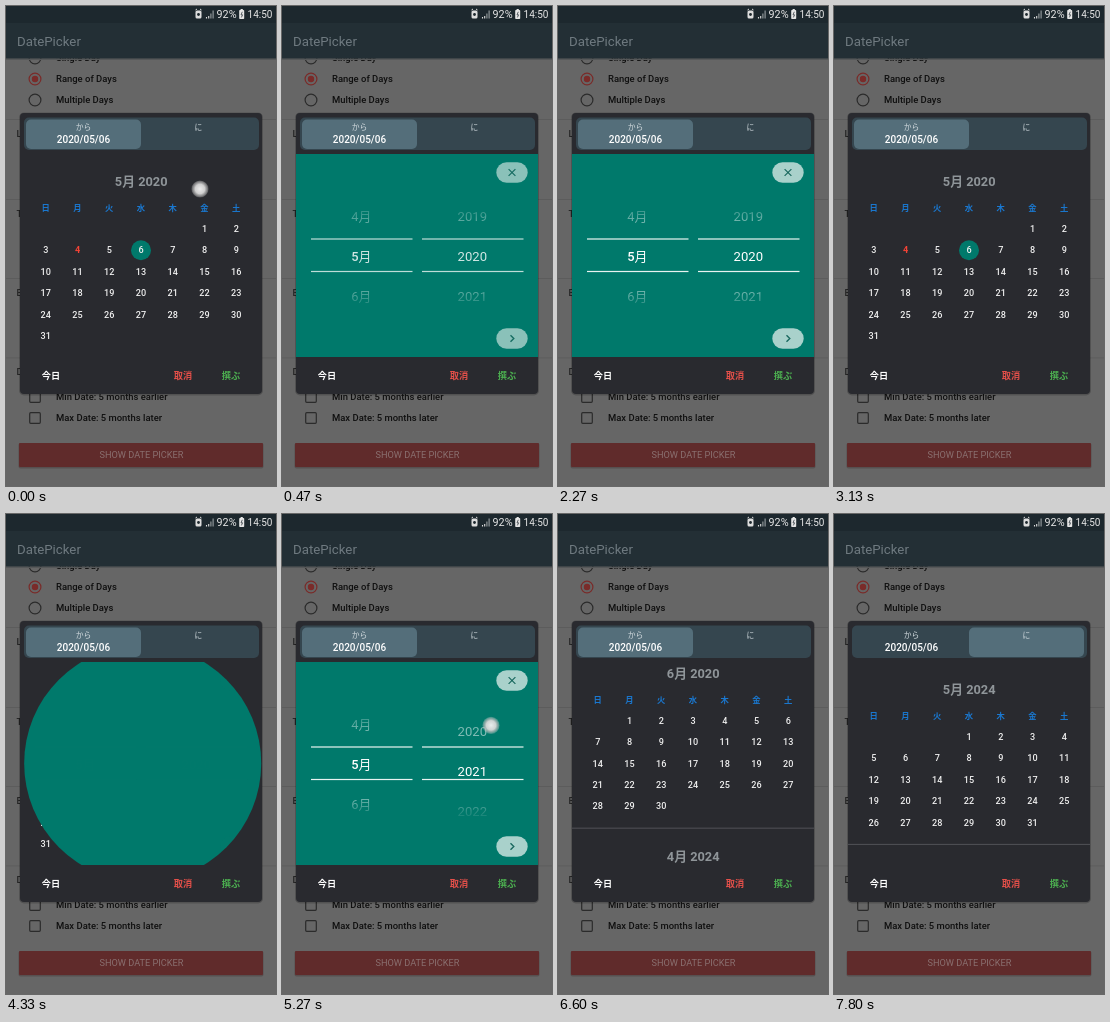
Animation, 270 px wide and 480 px high, one loop 8 s. Source, as an HTML page:

```html
<!DOCTYPE html>
<html lang="ja">
<head>
<meta charset="utf-8">
<title>Date picker</title>
<style>
  html, body { margin: 0; width: 100%; height: 100%; overflow: hidden; background: #686868; }
  svg { display: block; width: 100%; height: 100%; }
  text { font-family: Roboto, "Noto Sans CJK JP", "Noto Sans CJK", sans-serif; white-space: pre; }
</style>
</head>
<body>
<svg id="stage" viewBox="0 0 270 480">
  <defs>
    <clipPath id="bodyClip"><rect x="14" y="148" width="242" height="203"/></clipPath>
    <clipPath id="circleClip"><circle id="hole"/></clipPath>
    <radialGradient id="touchFill">
      <stop offset="0" stop-color="#f4f4f4"/>
      <stop offset=".55" stop-color="#d8d8d8"/>
      <stop offset=".75" stop-color="#bbb" stop-opacity=".8"/>
      <stop offset="1" stop-color="#ccc" stop-opacity=".25"/>
    </radialGradient>
    <linearGradient id="wheelFade" x1="0" y1="0" x2="0" y2="1">
      <stop offset="0" stop-color="#000"/>
      <stop offset=".2" stop-color="#fff"/>
      <stop offset=".8" stop-color="#fff"/>
      <stop offset="1" stop-color="#000"/>
    </linearGradient>
    <mask id="wheelMask" maskUnits="userSpaceOnUse" x="14" y="192" width="242" height="116">
      <rect x="14" y="192" width="242" height="116" fill="url(#wheelFade)"/>
    </mask>
  </defs>
  <g id="page"></g>
  <g id="dialog"></g>
  <g clip-path="url(#bodyClip)">
    <g id="months"></g>
    <g clip-path="url(#circleClip)">
      <rect x="14" y="148" width="242" height="203" fill="#00796b"/>
      <g id="chooser"></g>
    </g>
  </g>
  <g id="footer"></g>
  <circle id="touch" r="8.6" fill="url(#touchFill)"/>
</svg>
<script>
const LOOP = 8000;
const CENTER = [135, 249.5];
const TITLE = [194, 183], CLOSE = [235, 166], NEXT = [231, 333];
const FULL_RADIUS = 160;
const ROW = 21.4, WHEEL_ROW = 40;
const $ = id => document.getElementById(id);

function add(parent, tag, attrs, content) {
  const node = document.createElementNS('http://www.w3.org/2000/svg', tag);
  for (const key in attrs) node.setAttribute(key, attrs[key]);
  if (content !== undefined) node.textContent = content;
  parent.appendChild(node);
  return node;
}
const rect = (parent, x, y, width, height, fill, rx = 0) =>
  add(parent, 'rect', { x, y, width, height, fill, rx });
const path = (parent, d, stroke, width) =>
  add(parent, 'path', { d, stroke, 'stroke-width': width, fill: 'none' });

// Text whose capitals are vertically centred on y.
const label = (parent, content, x, y, size, fill, weight = 400, anchor = 'middle') =>
  add(parent, 'text', { x, y: y + size * 0.36, fill, 'font-size': size,
    'font-weight': weight, 'text-anchor': anchor }, content);

function buildPage() {
  const g = $('page');
  rect(g, 0, 0, 270, 480, '#666');
  for (const y of [113, 193, 272, 351.5]) rect(g, 0, y, 270, 0.8, '#5a5a5a');
  [['Single Day', 52], ['Range of Days', 73], ['Multiple Days', 94]].forEach(([name, y], i) => {
    const color = i === 1 ? '#7a2b29' : '#2b2b2b';
    add(g, 'circle', { cx: 29, cy: y, r: 5.9, fill: 'none', stroke: color, 'stroke-width': 1.2 });
    if (i === 1) add(g, 'circle', { cx: 29, cy: y, r: 3.2, fill: color });
    label(g, name, 50, y, 9.45, '#101010', 500, 'start');
  });
  ['L', 'T', 'E', 'D'].forEach((c, i) => label(g, c, 10.5, 128 + 79.3 * i, 9.45, '#222', 500, 'start'));
  [['Min', 'earlier', 391], ['Max', 'later', 412]].forEach(([end, side, y]) => {
    add(g, 'rect', { x: 23.7, y: y - 5.3, width: 10.6, height: 10.6, rx: 1,
      fill: 'none', stroke: '#2b2b2b', 'stroke-width': 1.2 });
    label(g, `${end} Date: 5 months ${side}`, 50, y, 9.45, '#101010', 500, 'start');
  });
  rect(g, 12.5, 437, 245, 25.5, '#575050', 2);
  rect(g, 13, 437, 244, 24, '#602b2b', 1);
  label(g, 'SHOW DATE PICKER', 135.5, 449, 9.2, '#8a7070');

  rect(g, 0, 52.5, 270, 1.5, '#565859');
  rect(g, 0, 17, 270, 35.5, '#232f35');
  label(g, 'DatePicker', 11, 35, 13.25, '#6f7a80', 400, 'start');
  rect(g, 0, 0, 270, 17, '#1d282e');
  rect(g, 189.5, 4.5, 6, 8, '#ddd', 1.5);
  add(g, 'circle', { cx: 192.5, cy: 8.5, r: 1.4, fill: '#1d282e' });
  path(g, 'M189.5 4l1.5-1M195.5 4l-1.5-1', '#ddd', 1);
  path(g, 'M200.5 12.5v-1.5M202.7 12.5v-2.5', '#ddd', 1.1);
  path(g, 'M204.9 12.5v-5M207.1 12.5v-8', '#9aa0a3', 1.1);
  label(g, '92%', 210.5, 8.2, 10.8, '#e6e6e6', 400, 'start');
  rect(g, 233.2, 4, 5, 9, '#e6e6e6', 0.8);
  rect(g, 234.6, 3, 2.2, 2, '#e6e6e6');
  path(g, 'M236.3 5.8l-1.3 3h1.6l-1.2 2.6', '#1d282e', 0.7);
  label(g, '14:50', 254, 8.2, 10, '#e6e6e6');
}

function buildDialog() {
  const g = $('dialog');
  add(g, 'rect', { x: 13, y: 106.5, width: 244, height: 283, rx: 5, fill: '#000', opacity: 0.2 });
  rect(g, 14, 107, 242, 281, '#292a2f', 4);
  rect(g, 18, 111.5, 235, 32.5, '#35464f', 5);
  const tab = rect(g, 20, 113.5, 115, 29.5, '#546e7a', 5);
  label(g, 'から', 77.5, 121, 7.8, '#d5dde1');
  label(g, 'に', 192.5, 121, 7.8, '#d5dde1');
  label(g, '2020/05/06', 77.5, 133.3, 10, '#fff', 500);
  const f = $('footer');
  label(f, '今日', 45, 370, 9.2, '#fff', 700);
  label(f, '取消', 177, 370, 9.2, '#e5504a', 700);
  label(f, '撰ぶ', 225, 370, 9.2, '#4caf50', 700);
  return tab;
}

// Stacks the months and returns the scroll distance to the last one.
function buildMonths() {
  const g = $('months');
  const column = i => 135 + 31.75 * (i - 3);
  let top = 175.5, last = top;
  for (const [year, month] of [[2020, 5], [2020, 6], [2024, 4], [2024, 5]]) {
    const first = new Date(year, month - 1, 1).getDay();
    const days = new Date(year, month, 0).getDate();
    const rowY = top + 47.3;
    const picked = year === 2020 && month === 5;
    label(g, `${month}月 ${year}`, 135.2, top - 0.3, 12.8, '#8f9599', 700);
    [...'日月火水木金土'].forEach((c, i) => label(g, c, column(i), top + 26.6, 8.3, '#1a78d0', 700));
    for (let day = 1; day <= days; day++) {
      const cell = first + day - 1;
      const x = column(cell % 7), y = rowY + ROW * Math.floor(cell / 7);
      const today = picked && day === 4;
      if (picked && day === 6) add(g, 'circle', { cx: x, cy: y, r: 10, fill: '#00796b' });
      label(g, day, x, y, 9.1, today ? '#f44336' : '#f0f0f0', today ? 700 : 500);
    }
    const end = rowY + ROW * (Math.ceil((first + days) / 7) - 1) + 22;
    rect(g, 14, end - 0.5, 242, 1, '#505156');
    last = top;
    top = end + 28.2;
  }
  return last - 175.5;
}

function buildChooser() {
  const g = $('chooser');
  for (const y of [166.5, 332.5]) rect(g, 214.3, y - 10.3, 31.4, 20.6, '#a9d1cb', 10.3);
  path(g, 'M226.6 163.1l6.8 6.8M233.4 163.1l-6.8 6.8', '#1b6a60', 1.2);
  path(g, 'M228.5 329.2l3.3 3.3l-3.3 3.3', '#1b6a60', 1.4);
  for (const x of [29, 140])
    for (const y of [233, 265.5]) rect(g, x, y - 0.6, 101.5, 1.2, '#e8f3f1');
  const wheel = add(g, 'g', { mask: 'url(#wheelMask)' });
  [4, 5, 6].forEach((m, i) =>
    label(wheel, `${m}月`, 79.3, 210.5 + WHEEL_ROW * i, 12.9, '#fff', i === 1 ? 500 : 400)
      .setAttribute('opacity', i === 1 ? 1 : 0.45));
  const years = [];
  for (let year = 2018; year <= 2026; year++)
    years.push({ offset: (year - 2020) * WHEEL_ROW, node: label(wheel, year, 190.3, 0, 13.1, '#fff') });
  return years;
}

const ramp = (t, from, to) => Math.min(1, Math.max(0, (t - from) / (to - from)));
const easeOut = p => 1 - (1 - p) ** 2;
const easeInOut = p => (1 - Math.cos(Math.PI * p)) / 2;

// Start time, direction and the spot the circle comes from or goes to.
const PANEL_MOVES = [
  [30, 'open', TITLE], [870, 'close', CLOSE],
  [1800, 'open', TITLE], [2660, 'close', CLOSE],
  [4000, 'open', TITLE], [6000, 'close', NEXT]
];

function panelAt(t) {
  const move = PANEL_MOVES.filter(m => m[0] <= t).pop();
  if (!move) return { r: 0, x: 0, y: 0, content: 0 };
  const [start, kind, spot] = move;
  const opening = kind === 'open';
  const away = opening ? 1 - ramp(t, start + 90, start + 370) : ramp(t, start + 170, start + 450);
  const arc = away ** 1.8;
  return {
    r: FULL_RADIUS * (1 - away) ** 2,
    x: CENTER[0] + (spot[0] - CENTER[0]) * arc,
    y: CENTER[1] + (spot[1] - CENTER[1]) * arc * arc,
    content: opening ? ramp(t, start + 330, start + 465) : 1 - ramp(t, start + 80, start + 200)
  };
}

const DRAG = { from: 5130, to: 5400, length: 76 };
const dragAt = t => DRAG.length * ramp(t, DRAG.from, DRAG.to) ** 1.3;
const wheelAt = t => dragAt(t) + (4 * WHEEL_ROW - DRAG.length) * easeOut(ramp(t, DRAG.to, 5930));

// Press time, release time, position.
const TOUCHES = [
  [-1, 100, ...TITLE], [870, 1070, ...CLOSE], [1800, 1910, ...TITLE], [4000, 4110, ...TITLE],
  [4800, 5400, 209, 244], [6000, 6120, ...NEXT], [7330, 7440, 195, 130]
];
const FADE = 200;

const tab = buildDialog();
const scrollLength = buildMonths();
const years = buildChooser();
buildPage();

function render(t) {
  const panel = panelAt(t);
  $('hole').setAttribute('cx', panel.x);
  $('hole').setAttribute('cy', panel.y);
  $('hole').setAttribute('r', panel.r);
  $('chooser').setAttribute('opacity', panel.content);

  const spin = wheelAt(t);
  for (const { offset, node } of years) {
    const dy = offset - spin, distance = Math.abs(dy);
    node.setAttribute('transform', `translate(0 ${250.3 + dy})`);
    node.setAttribute('opacity', distance < 17 ? 1 : Math.max(0, 0.75 - distance * 0.0075));
  }

  const scroll = scrollLength * easeOut(ramp(t, 6460, 7110));
  $('months').setAttribute('transform', `translate(0 ${-scroll})`);
  tab.setAttribute('x', 20 + 115 * easeInOut(ramp(t, 7450, 7790)));

  const touch = TOUCHES.find(([down, up]) => t >= down && t < up + FADE);
  $('touch').setAttribute('opacity', touch ? 0.95 * (1 - ramp(t, touch[1], touch[1] + FADE)) : 0);
  if (touch) {
    $('touch').setAttribute('cx', touch[2]);
    $('touch').setAttribute('cy', touch[3] - (touch[0] === 4800 ? dragAt(t) : 0));
  }
}

const started = performance.now();
function tick() {
  render((performance.now() - started) % LOOP);
  requestAnimationFrame(tick);
}
tick();
</script>
</body>
</html>
```
